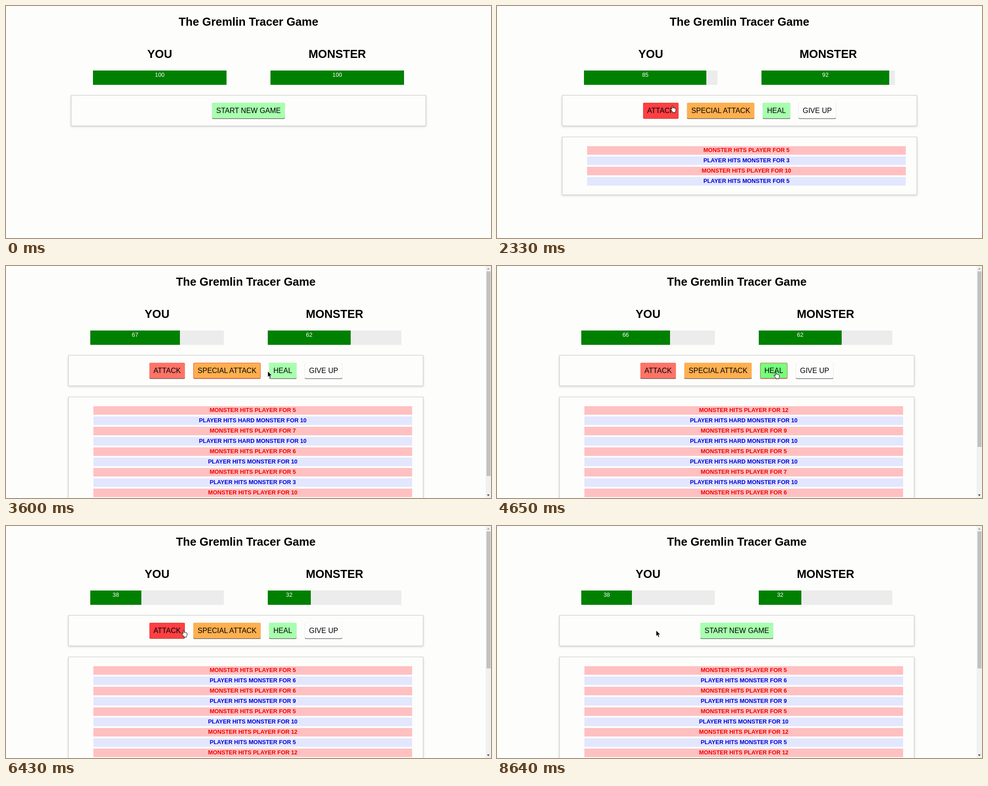
Recreate the animation shown at these times as an HTML page. Size 1082 by 518 pixels, loop 8680 ms.

```html
<!DOCTYPE html>
<html lang="en">
<head>
<meta charset="utf-8">
<title>The Gremlin Tracer Game</title>
<style>
  html, body { margin: 0; width: 100%; height: 100%; overflow: hidden; background: #fdfdfc; }
  body { font: 12.8px "Liberation Sans", Arial, sans-serif; color: #000; }
  #stage { position: relative; width: 1082px; height: 518px; overflow: hidden; }
  #page { position: absolute; inset: 0; }
  #page > * { position: absolute; box-sizing: border-box; margin: 0; }
  h1 { font-size: 25.6px; line-height: 30px; text-align: center; white-space: nowrap; }
  .track { top: 144px; width: 297.5px; height: 32px; background: #ececec; }
  .fill { height: 32px; background: #008000; color: #fff; text-align: center; line-height: 19px; }
  .panel { left: 145px; width: 792px; border: 1px solid #ccc; box-shadow: 0 2.4px 4.8px #ccc; background: #fdfdfc; }
  #controls { top: 199px; height: 69px; display: flex; justify-content: center; gap: 18.9px; padding-top: 16px; }
  .btn { height: 35px; line-height: 36px; padding: 0 9.4px; font-size: 16px; white-space: nowrap;
         border-radius: 2.4px; box-shadow: 0 .8px .8px #000; box-sizing: border-box; }
  .focus { outline: 1px solid rgba(222, 66, 40, .75); outline-offset: -1px; box-shadow: 0 .8px .8px #a03020; }
  #log { top: 292px; }
  .row { position: absolute; left: 55px; width: 711px; height: 19px; line-height: 18px;
         font-weight: bold; text-align: center; white-space: nowrap; }
  .player { color: #0000d8; background: #e2e7fd; }
  .monster { color: #f00000; background: #ffc0c1; }
  #scroll { position: absolute; left: 1070px; top: 0; width: 12px; height: 518px; background: #f1f1f1; }
  #thumb { position: absolute; left: 1.5px; top: 12px; width: 9px; background: #c1c1c1; }
  #scroll svg { position: absolute; left: 0; top: 0; }
  #cursor { position: absolute; left: 0; top: 0; overflow: visible; }
</style>
</head>
<body>
<div id="stage">
  <div id="page">
    <h1 style="left:145px;width:792px;top:20px">The Gremlin Tracer Game</h1>
    <h1 style="left:145px;width:396px;top:92px">YOU</h1>
    <h1 style="left:541px;width:396px;top:92px">MONSTER</h1>
    <div class="track" style="left:194.25px"><div class="fill" id="you"></div></div>
    <div class="track" style="left:590.25px"><div class="fill" id="foe"></div></div>
    <div class="panel" id="controls"></div>
    <div class="panel" id="log"></div>
  </div>
  <div id="scroll">
    <div id="thumb"></div>
    <svg width="12" height="518"><path d="M3 8l3-4 3 4z" fill="#a3a3a3"/><path d="M3 510l3 4 3-4z" fill="#505050"/></svg>
  </div>
  <svg id="cursor" width="20" height="20">
    <path id="arrow" d="M0 0V13.2L3 10.4L5 15.2L7.3 14.2L5.3 9.6H9.4Z" fill="#000" stroke="#fff" stroke-width=".8"/>
    <path id="hand" transform="translate(-5 0)" fill="#fff" stroke="#000" stroke-linejoin="round"
      d="M4 1.5q1-1.5 2.2 0V6l.3-.5q1.6-.8 2.1.5 1.5-.7 2.2.6 1.6-.5 2.2.8v4.1q-.3 2-1.4 3V16H6v-1.3Q4.5 13 1.2 9q-.7-1.4.6-1.7 1.2 0 2.2 1.6Z"/>
  </svg>
</div>
<script>
const LOOP = 8680, START = 960, MOVED = 1200, QUIT = 7800, FADE = 400;
const $ = id => document.getElementById(id);

// name, label, colour, hover colour, left, right
const BUTTONS = [
  ['attack', 'ATTACK', '#ff7367', '#ff3f43', 325, 405],
  ['special', 'SPECIAL ATTACK', '#ffaf4f', '#ff9a2b', 423, 575],
  ['heal', 'HEAL', '#a8ffae', '#76ff7e', 593, 655],
  ['quit', 'GIVE UP', '#fdfdfd', '#c7c7c7', 673, 757],
];
const NEW_GAME = [['start', 'START NEW GAME', '#a8ffae', '#76ff7e', 460, 622]];

// time, button, player's points, monster's points
const TURNS = [
  [2120, 'attack', 5, 10], [2260, 'attack', 3, 5], [2400, 'attack', 10, 6],
  [2870, 'special', 10, 7], [2960, 'special', 10, 5],
  [4030, 'heal', 10, 9], [4450, 'heal', 10, 12],
  [5352, 'attack', 5, 12], [5492, 'attack', 10, 5], [5632, 'attack', 9, 6],
  [6095, 'attack', 6, 5],
];

// time, x, y of the pointer
const PATH = [
  [300, 700, 517], [530, 550, 250], [MOVED, 550, 250], [1650, 391, 224],
  [1990, 391, 224], [2050, 391, 222], [2580, 391, 222], [2820, 480, 238],
  [3480, 480, 238], [3600, 584, 235], [3780, 622, 236], [5120, 622, 236],
  [5330, 394, 231], [6020, 394, 231], [6080, 396, 232], [7300, 396, 232],
  [7430, 708, 238], [7900, 708, 238], [8600, 355, 233],
];

// CSS "ease"
function ease(p) {
  if (p <= 0) return 0;
  if (p >= 1) return 1;
  const bez = (a, b, s) => 3 * a * s * (1 - s) ** 2 + 3 * b * s * s * (1 - s) + s ** 3;
  let lo = 0, hi = 1;
  for (let i = 0; i < 20; i++) {
    const mid = (lo + hi) / 2;
    if (bez(.25, .25, mid) < p) lo = mid; else hi = mid;
  }
  return bez(.1, 1, lo);
}

// Each hit restarts the bar's transition from wherever it is.
function health(t, done, loss) {
  let from = 100, to = 100, since = -1e4;
  const at = now => from + (to - from) * ease((now - since) / FADE);
  for (const turn of done) {
    from = at(turn[0]);
    to -= loss(turn);
    since = turn[0];
  }
  return [to, at(t)];
}

function pointer(t) {
  const i = PATH.findIndex(k => k[0] > t);
  if (i === 0) return null;
  if (i < 0) return PATH[PATH.length - 1].slice(1);
  const [t0, x0, y0] = PATH[i - 1], [t1, x1, y1] = PATH[i];
  const p = (t - t0) / (t1 - t0);
  return [x0 + (x1 - x0) * p, y0 + (y1 - y0) * p];
}

function setBar(el, [points, width]) {
  el.style.width = width + '%';
  el.textContent = points;
}

let shownRows = -1, shownSet = null;

function drawLog(done) {
  if (done.length === shownRows) return;
  shownRows = done.length;
  const rows = [];
  for (const [, kind, hit, bite] of done) {
    const verb = kind === 'attack' ? 'HITS' : 'HITS HARD';
    rows.unshift(['monster', `MONSTER HITS PLAYER FOR ${bite}`],
                 ['player', `PLAYER ${verb} MONSTER FOR ${hit}`]);
  }
  const log = $('log');
  log.style.display = rows.length ? '' : 'none';
  log.style.height = 38 + 23 * rows.length + 'px';
  log.innerHTML = rows.map(([who, text], i) =>
    `<div class="row ${who}" style="top:${20 + 23 * i}px">${text}</div>`).join('');
}

function drawButtons(set, hover, focus) {
  const box = $('controls');
  if (set !== shownSet) {
    shownSet = set;
    box.innerHTML = set.map(b => `<div class="btn">${b[1]}</div>`).join('');
  }
  set.forEach(([name, , color, lit], i) => {
    const el = box.children[i];
    el.style.background = name === hover ? lit : color;
    el.classList.toggle('focus', name === focus);
  });
}

function draw(t) {
  const done = TURNS.filter(turn => turn[0] <= t);
  setBar($('you'), health(t, done, ([, kind, , bite]) => bite - (kind === 'heal' ? 10 : 0)));
  setBar($('foe'), health(t, done, ([, kind, hit]) => kind === 'heal' ? 0 : hit));
  drawLog(done);

  const pageHeight = 330 + 46 * done.length;
  const scrolls = pageHeight > 518;
  const shift = scrolls ? -6 : 0;
  $('page').style.left = shift + 'px';
  $('scroll').style.display = scrolls ? '' : 'none';
  $('thumb').style.height = 494 * 518 / pageHeight + 'px';

  const playing = t >= START && t < QUIT;
  const set = playing ? BUTTONS : NEW_GAME;
  const pos = pointer(t);
  const over = pos && set.find(b => pos[0] >= b[4] + shift && pos[0] <= b[5] + shift &&
                                    pos[1] >= 216 && pos[1] <= 252);
  // Until the pointer moves, the first button keeps the hover and focus of the one it replaced.
  const stale = t >= START && t <= MOVED;
  const last = done[done.length - 1];
  drawButtons(set, stale ? 'attack' : over && over[0], last ? last[1] : 'attack');

  $('cursor').style.display = pos ? '' : 'none';
  if (!pos) return;
  $('cursor').style.transform = `translate(${Math.round(pos[0])}px, ${Math.round(pos[1])}px)`;
  $('hand').style.display = over ? '' : 'none';
  $('arrow').style.display = over ? 'none' : '';
}

const begin = performance.now();
function frame() {
  draw((performance.now() - begin) % LOOP);
  requestAnimationFrame(frame);
}
frame();
</script>
</body>
</html>
```
